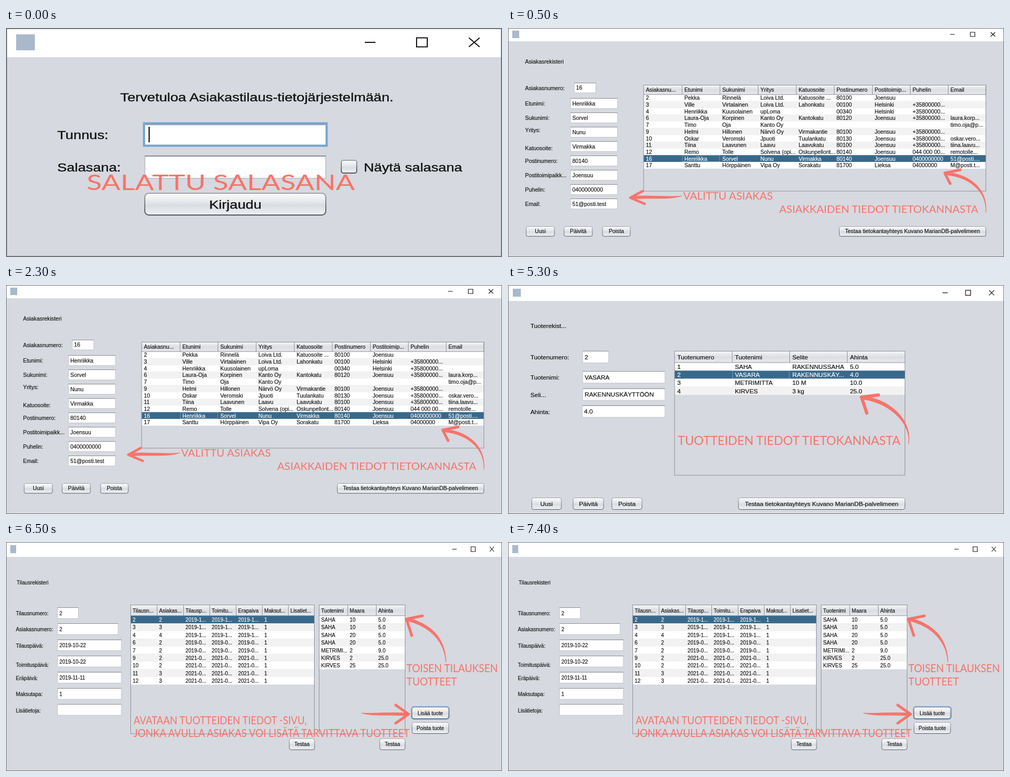
Animation, 929 px wide and 431 px high, one loop 8 s. Source, as an HTML page:

```html
<!DOCTYPE html>
<html lang="fi">
<head>
<meta charset="utf-8">
<title>Asiakastilaus</title>
<style>
html, body { margin: 0; width: 100%; height: 100%; overflow: hidden; background: #d6d9df; }
svg { display: block; width: 929px; height: 431px; }
text { font-family: "Liberation Sans", Arial, sans-serif; white-space: pre; }
.note { font-family: Lato, "Open Sans", sans-serif; font-weight: 400; fill: #f8736b; }
</style>
</head>
<body>
<svg id="stage" viewBox="0 0 929 431">
  <defs>
    <linearGradient id="btn" x2="0" y2="1">
      <stop offset="0" stop-color="#fbfbfc"/><stop offset=".45" stop-color="#e3e5e9"/>
      <stop offset=".55" stop-color="#d9dce1"/><stop offset="1" stop-color="#eff1f4"/>
    </linearGradient>
    <linearGradient id="rim" x2="0" y2="1">
      <stop offset="0" stop-color="#a0a4ab"/><stop offset="1" stop-color="#55595f"/>
    </linearGradient>
    <linearGradient id="head" x2="0" y2="1">
      <stop offset="0" stop-color="#f5f6f8"/><stop offset=".5" stop-color="#dcdee3"/><stop offset="1" stop-color="#e6e8ec"/>
    </linearGradient>
  </defs>
</svg>
<script>
const NS = "http://www.w3.org/2000/svg";
const CORAL = "#f8736b", EDGE = "#8d9199";
const stage = document.getElementById("stage");
let layer, font;

function add(tag, attrs, content) {
  const el = document.createElementNS(NS, tag);
  for (const key in attrs) el.setAttribute(key, attrs[key]);
  if (content !== undefined) el.textContent = content;
  layer.appendChild(el);
  return el;
}
const rect = (x, y, r, b, fill, more) =>
  add("rect", { x, y, width: r - x, height: b - y, fill, ...more });
const path = (d, stroke, width, more) =>
  add("path", { d, stroke, "stroke-width": width, fill: "none", ...more });

// Interface text, placed by its vertical middle
function label(x, mid, str, more) {
  const fill = more && more.fill || "#111";
  add("text", {
    transform: `translate(${x} ${mid + font.size * .36}) scale(${font.wide} 1)`,
    "font-size": font.size, stroke: fill, "stroke-width": font.size * .015, ...more, fill
  }, str);
}

function note(x, base, size, wide, str) {
  add("text", {
    class: "note", transform: `translate(${x} ${base}) scale(${wide} 1)`, "font-size": size
  }, str);
}

function scene(size, wide, bar, icon, ctl) {
  layer = stage;
  layer = add("g", { visibility: "hidden" });
  font = { size, wide };
  rect(0, 0, 929, 431, "#d6d9df");
  rect(0, 0, 929, bar, "#fff");
  rect(...icon, "#a9b9cb");
  const { min, max, close, w, h, y, line } = ctl;
  path(`M${min} ${y + h / 2}h${w}M${max} ${y}h${w}v${h}h${-w}z`, "#111", line);
  path(`M${close} ${y}l${w} ${h}m0 ${-h}l${-w} ${h}`, "#111", line);
  const edge = line > 1.5 ? 2 : 1;
  rect(edge / 2, edge / 2, 929 - edge / 2, 431 - edge / 2, "none", { stroke: "#6f7277", "stroke-width": edge });
  return layer;
}

function field(x, y, r, b, str = "", line = 1) {
  rect(x, y, r, b, "#fff", { stroke: "#c3c6cc", "stroke-width": line });
  path(`M${x} ${y}H${r}`, "#8a8d93", line);
  label(x + 3.5, (y + b) / 2, str);
}

function button(x, y, r, b, str, focus) {
  const round = (b - y) / 5.5, line = b - y > 30 ? 2 : 1;
  if (focus) rect(x - 1, y - 1, r + 1, b + 1, "none", { rx: round + 1, stroke: "#73a4d1", "stroke-width": 2 });
  rect(x, y, r, b, "url(#btn)", { rx: round, stroke: "url(#rim)", "stroke-width": line });
  label((x + r) / 2, (y + b) / 2, str, { "text-anchor": "middle" });
}

// cols holds the left edge of each column and the right edge of the table
function table(cols, top, body, bottom, pitch, pad, heads, rows, chosen, cell) {
  const left = cols[0], right = cols[cols.length - 1];
  rect(left, top, right, body, "url(#head)");
  rows.forEach((row, i) => {
    const y = body + i * pitch;
    rect(left, y, right, y + pitch, i === chosen ? "#39698a" : i % 2 ? "#f2f2f2" : "#fff");
    row.forEach((str, c) =>
      label(cols[c] + pad, y + pitch / 2 + .3, str, { fill: i === chosen ? "#fff" : "#111" }));
  });
  heads.forEach((str, c) => {
    label(cols[c] + pad, (top + body) / 2 + .5, str);
    path(`M${cols[c + 1]} ${top}V${body}`, EDGE, 1);
  });
  path(`M${left} ${body}H${right}`, EDGE, 1);
  rect(left, top, right, bottom, "none", { stroke: EDGE });
  if (cell !== undefined) {
    const y = body + chosen * pitch;
    rect(cols[cell] + .5, y + .5, cols[cell + 1] - .5, y + pitch - .5, "none", { stroke: "#7fa6c2", "stroke-width": .8 });
  }
}

// Brush arrow: a shaft that swells towards the tip, with two barbs
function arrow([ax, ay], [bx, by], [cx, cy], [dx, dy], tip, barbA, barbB, w) {
  const len = Math.hypot(dx - cx, dy - cy), nx = (cy - dy) / len * w / 2, ny = (dx - cx) / len * w / 2;
  add("path", {
    fill: CORAL, stroke: CORAL, "stroke-width": 1.2, "stroke-linejoin": "round",
    d: `M${ax} ${ay}C${bx + nx} ${by + ny} ${cx + nx} ${cy + ny} ${dx + nx} ${dy + ny}` +
       `L${dx - nx} ${dy - ny}C${cx - nx} ${cy - ny} ${bx - nx} ${by - ny} ${ax} ${ay}z`
  });
  path(`M${barbA}L${tip}L${barbB}`, CORAL, w, { "stroke-linecap": "round", "stroke-linejoin": "round" });
}

function login() {
  const g = scene(22.6, 1.185, 55, [19, 12, 54, 42],
    { min: 672, max: 769, close: 867, w: 20, h: 17, y: 18.5, line: 2 });
  label(214, 130, "Tervetuloa Asiakastilaus-tietojärjestelmään.");
  label(96, 201, "Tunnus:");
  label(96, 261.5, "Salasana:");
  rect(258.5, 179.5, 600.5, 221.5, "#fff", { stroke: "#73a4d1", "stroke-width": 4 });
  path("M261 182H598", "#8a929c", 1.5);
  rect(267, 186, 269.2, 215, "#111");
  field(260, 241, 599, 283, "", 2);
  rect(628, 249, 657, 273, "url(#btn)", { rx: 4, stroke: "url(#rim)", "stroke-width": 2 });
  label(670, 261.5, "Näytä salasana");
  button(260, 311, 599, 352, "Kirjaudu");
  note(151, 304.5, 40.5, 1.3, "SALATTU SALASANA");
  return g;
}

function customers() {
  const g = scene(10, 1.035, 25, [8, 5, 21, 19],
    { min: 828, max: 866, close: 904, w: 8.5, h: 8, y: 8, line: 1.1 });
  label(32, 63.5, "Asiakasrekisteri");
  label(32, 113, "Asiakasnumero:");
  field(124, 103.5, 164.5, 122, "16");
  const form = [
    [142, "Etunimi:", "Henriikka"], [169, "Sukunimi:", "Sorvel"], [192, "Yritys:", "Nunu"],
    [226, "Katuosoite:", "Virmakka"], [250, "Postinumero:", "80140"],
    [277, "Postitoimipaikk...", "Joensuu"], [304, "Puhelin:", "0400000000"], [331, "Email:", "51@posti.test"]
  ];
  form.forEach(([y, name, value], i) => {
    const mid = 142 + i * 27;
    label(32, y, name);
    field(117, mid - 9.5, 205, mid + 9.5, value);
  });
  const rows = [
    "2|Pekka|Rinnelä|Loiva Ltd.|Katuosoite ...|80100|Joensuu",
    "3|Ville|Virtalainen|Loiva Ltd.|Lahonkatu|00100|Helsinki|+35800000...",
    "4|Henriikka|Kuusolainen|upLoma||00340|Helsinki|+35800000...",
    "6|Laura-Oja|Korpinen|Kanto Oy|Kantokatu|80120|Joensuu|+35800000...|laura.korp...",
    "7|Timo|Oja|Kanto Oy|||||timo.oja@p...",
    "9|Helmi|Hillonen|Närvö Oy|Virmakantie|80100|Joensuu|+35800000...",
    "10|Oskar|Veromski|Jpuoti|Tuulankatu|80130|Joensuu|+35800000...|oskar.vero...",
    "11|Tiina|Laavunen|Laavu|Laavukatu|80100|Joensuu|+35800000...|tiina.laavu...",
    "12|Remo|Tolle|Solvena (opi...|Oskunpellont...|80140|Joensuu|044 000 00...|remotolle...",
    "16|Henriikka|Sorvel|Nunu|Virmakka|80140|Joensuu|0400000000|51@posti....",
    "17|Santtu|Hörppäinen|Vipa Oy|Sorakatu|81700|Lieksa|04000000|M@posti.t..."
  ].map(r => r.split("|"));
  table([254, 326, 397, 468.5, 540, 611, 682.5, 753.5, 824.5, 895], 107.5, 125.2, 307, 12.68, 4.2,
    ["Asiakasnu...", "Etunimi", "Sukunimi", "Yritys", "Katuosoite", "Postinumero", "Postitoimip...", "Puhelin", "Email"],
    rows, 9, 1);
  button(34, 373.5, 87, 392, "Uusi");
  button(105, 373.5, 158, 392, "Päivitä");
  button(177, 373.5, 229, 392, "Poista");
  button(620.5, 373.5, 895, 392, "Testaa tietokantayhteys Kuvano MarianDB-palvelimeen");
  note(328, 322.5, 19.5, 1.04, "VALITTU ASIAKAS");
  note(508, 348, 20, 1, "ASIAKKAIDEN TIEDOT TIETOKANNASTA");
  arrow([325, 316], [300, 322], [265, 316], [232, 319.5], "229,319.5", "252,307", "256,331", 4.6);
  arrow([895, 347], [898, 307], [867, 279], [822, 274], "818,273", "847,267", "828,293", 5);
  return g;
}

function products() {
  const g = scene(11.5, 1.02, 30, [9, 7, 24, 22],
    { min: 814, max: 857, close: 901, w: 9.5, h: 9.5, y: 9.8, line: 1.2 });
  label(42, 77, "Tuoterekist...");
  label(42, 136, "Tuotenumero:");
  label(42, 174, "Tuotenimi:");
  label(42, 207, "Seli...");
  label(42, 238.5, "Ahinta:");
  field(140, 124.5, 188.5, 146.5, "2");
  field(140, 162.5, 294, 184.5, "VASARA");
  field(140, 195, 294, 217, "RAKENNUSKÄYTTÖÖN");
  field(139, 227, 294, 249, "4.0");
  table([312, 420, 527.5, 635.5, 743.5], 124.5, 146, 358, 15.2, 5,
    ["Tuotenumero", "Tuotenimi", "Selite", "Ahinta"],
    [["1", "SAHA", "RAKENNUSSAHA", "5.0"], ["2", "VASARA", "RAKENNUSKÄY...", "4.0"],
     ["3", "METRIMITTA", "10 M", "10.0"], ["4", "KIRVES", "3 kg", "25.0"]], 1, 1);
  button(44.5, 400.5, 100, 422.5, "Uusi");
  button(122, 400.5, 179, 422.5, "Päivitä");
  button(194.5, 400.5, 251, 422.5, "Poista");
  button(431.5, 400.5, 743.5, 422.5, "Testaa tietokantayhteys Kuvano MarianDB-palvelimeen");
  note(318, 301, 23, .99, "TUOTTEIDEN TIEDOT TIETOKANNASTA");
  arrow([750, 299], [757, 265], [725, 222], [666, 212], "662,211", "694,207", "672,241", 6);
  return g;
}

function orders() {
  const g = scene(10.8, .9, 28, [8, 6, 19, 21],
    { min: 836, max: 871, close: 906, w: 8, h: 9, y: 9, line: 1.1 });
  label(20, 76, "Tilausrekisteri");
  const form = [
    [134, "Tilausnumero:", 123.5, 135.5, "2"], [164, "Asiakasnumero:", 153.5, 210, "2"],
    [195, "Tilauspäivä:", 184, 216, "2019-10-22"], [231, "Toimituspäivä:", 214.5, 216, "2019-10-22"],
    [256, "Eräpäivä:", 245, 216, "2019-11-11"], [286, "Maksutapa:", 275.5, 216, "1"],
    [317, "Lisätietoja:", 305.5, 216, ""]
  ];
  for (const [mid, name, top, right, value] of form) {
    label(18.5, mid, name);
    field(96.5, top, right, top + 20.5, value);
  }
  const rows = ["2 2 19-1", "3 3 19-1", "4 4 19-1", "6 2 19-0", "7 2 19-0", "9 2 21-0", "10 2 21-0", "11 3 21-0", "12 3 21-0"]
    .map(r => {
      const [id, who, day] = r.split(" "), date = `20${day}...`;
      return [id, who, date, date, date, "1"];
    });
  table([233.5, 283, 332.5, 381.5, 431, 480, 529, 577.5], 118.5, 138.7, 361, 14.4, 3.8,
    ["Tilausn...", "Asiakas...", "Tilausp...", "Toimitu...", "Erapaiva", "Maksut...", "Lisatiet..."], rows, 0);
  table([586.5, 640, 693.5, 747.5], 118.5, 138.7, 361, 14.4, 3.8, ["Tuotenimi", "Maara", "Ahinta"],
    [["SAHA", "10", "5.0"], ["SAHA", "10", "5.0"], ["SAHA", "20", "5.0"], ["SAHA", "20", "5.0"],
     ["METRIMI...", "2", "9.0"], ["KIRVES", "2", "25.0"], ["KIRVES", "25", "25.0"]], -1);
  button(530.5, 370, 578, 391, "Testaa");
  button(700, 370, 747.5, 391, "Testaa");
  button(760.5, 311, 829, 332.5, "Lisää tuote", true);
  button(760.5, 339.5, 829, 360.5, "Poista tuote");
  note(750, 245, 21.2, .89, "TOISEN TILAUKSEN");
  note(750, 269.5, 21.2, .89, "TUOTTEET");
  note(239, 342.5, 21.2, .86, "AVATAAN TUOTTEIDEN TIEDOT -SIVU,");
  note(239, 366.5, 21.2, .87, "JONKA AVULLA ASIAKAS VOI LISÄTÄ TARVITTAVA TUOTTEET");
  arrow([824, 226], [822, 185], [797, 158], [754, 146], "750,145", "780,139", "760,176", 5);
  arrow([666, 322], [690, 326], [720, 322], [750, 324.5], "754,324", "730,307", "730,341", 5);
  return g;
}

const views = [login(), customers(), products(), orders()];
const starts = [0, 500, 3500, 6500], LOOP = 8000;

function draw(t) {
  const now = starts.filter(s => s <= t).length - 1;
  views.forEach((v, i) => v.setAttribute("visibility", i === now ? "visible" : "hidden"));
}

const begin = performance.now();
function tick() {
  draw((performance.now() - begin) % LOOP);
  requestAnimationFrame(tick);
}
draw(0);
requestAnimationFrame(tick);
</script>
</body>
</html>
```
